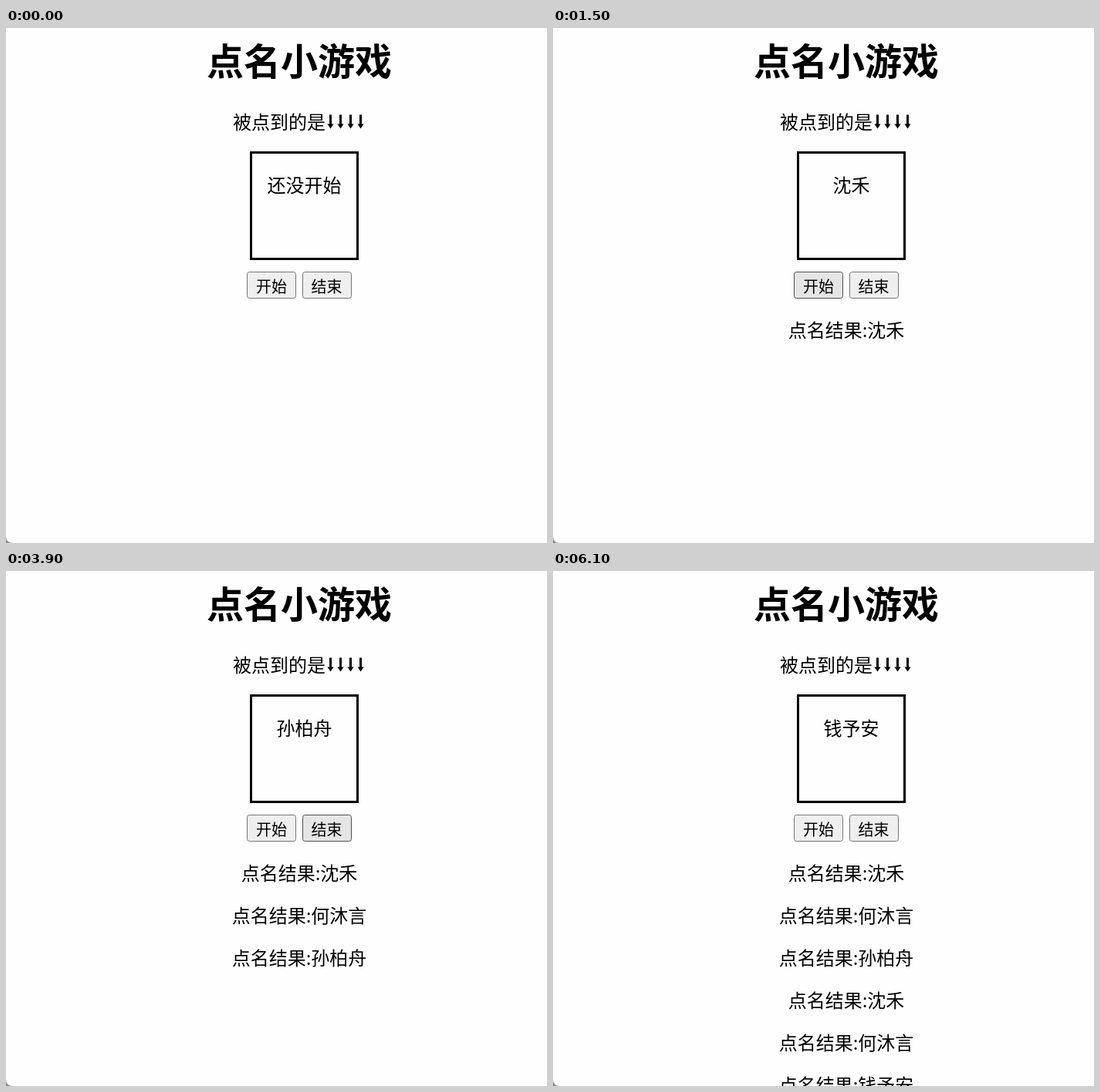
Write an HTML page that moves like this. It is 701 px wide and 668 px high and loops after 7.2 s.

```html
<!DOCTYPE html>
<html lang="zh-CN">
<head>
<meta charset="utf-8">
<style>
html, body { margin: 0; width: 100%; height: 100%; overflow: hidden; background: #fefefe; }
svg { display: block; }
text { font: 350 24px "Noto Sans CJK SC", "Noto Sans CJK", sans-serif; text-anchor: middle; }
.title { font-size: 48px; font-weight: 700; }
.label { font-size: 20px; }
.normal { fill: #efefef; stroke: #767676; }
.hover { fill: #e5e5e5; stroke: #4f4f4f; }
.active { fill: #f5f5f5; stroke: #8d8d8d; }
</style>
</head>
<body>
<svg width="701" height="668" viewBox="0 0 701 668">
  <defs><path id="arrow" d="M-1.5 112.5h3V124.5H4L0 130.5L-4 124.5H-1.5Z"/></defs>
  <path d="M0 659Q0 668 9 668H0Z" fill="#8c8c8c"/>
  <text class="title" x="380" y="61">点名小游戏</text>
  <text x="354" y="131">被点到的是</text>
  <use href="#arrow" x="420.5"/><use href="#arrow" x="433.5"/>
  <use href="#arrow" x="446.5"/><use href="#arrow" x="459.5"/>
  <rect x="317.5" y="161.5" width="138" height="138" fill="none" stroke="#000" stroke-width="3"/>
  <text id="name" x="386.5" y="213"></text>
  <rect id="start" x="312.5" y="316.5" width="63" height="34" rx="3"/>
  <rect id="stop" x="384.5" y="316.5" width="63" height="34" rx="3"/>
  <text class="label" x="344" y="342.5">开始</text>
  <text class="label" x="415.5" y="342.5">结束</text>
  <g id="results"></g>
</svg>
<script>
const LOOP = 7200;
const [LI, HE, SUN, QIAN, DING] = ["沈禾", "何沐言", "孙柏舟", "钱予安", "丁书禾"];
const picks = [[1400, LI], [2500, HE], [3400, SUN], [4200, LI], [5100, HE], [5900, QIAN]];

// [time, button under the pointer, its state]
const pointer = [
  [0, "", ""], [300, "start", "hover"],
  [600, "start", "active"], [700, "start", "hover"], [1200, "stop", "hover"],
  [1300, "stop", "active"], [1400, "stop", "hover"], [1500, "start", "hover"],
  [2000, "start", "active"], [2100, "start", "hover"], [2300, "stop", "hover"],
  [2400, "stop", "active"], [2500, "stop", "hover"], [2700, "start", "hover"],
  [3000, "start", "active"], [3100, "start", "hover"], [3200, "stop", "hover"],
  [3300, "stop", "active"], [3400, "stop", "hover"], [3600, "start", "hover"],
  [3800, "start", "active"], [3900, "stop", "hover"],
  [4100, "stop", "active"], [4200, "stop", "hover"], [4400, "start", "hover"],
  [4700, "start", "active"], [4800, "start", "hover"], [4900, "stop", "hover"],
  [5000, "stop", "active"], [5100, "stop", "hover"], [5300, "start", "hover"],
  [5600, "start", "active"], [5700, "stop", "hover"],
  [5800, "stop", "active"], [5900, "stop", "hover"], [6100, "", ""]
];

// [time, name in the box]
const names = [
  [0, "还没开始"], [600, HE], [700, QIAN], [800, DING], [900, SUN], [1000, LI],
  [1100, HE], [1200, DING], [1300, SUN], [1400, LI],
  [2000, SUN], [2100, QIAN], [2300, LI], [2400, DING], [2500, HE],
  [3000, LI], [3100, QIAN], [3200, DING], [3300, HE], [3400, SUN],
  [4100, QIAN], [4200, LI], [4700, DING], [4800, SUN], [4900, HE],
  [5600, SUN], [5700, LI], [5800, DING], [5900, QIAN]
];

const $ = id => document.getElementById(id);
const at = (list, t) => list.findLast(step => step[0] <= t);

$("results").innerHTML = picks.map(([, name], i) =>
  `<text x="380" y="${401 + 55 * i}">点名结果:${name}</text>`).join("");

function draw(now) {
  const t = now % LOOP;
  const [, button, state] = at(pointer, t);
  for (const id of ["start", "stop"])
    $(id).setAttribute("class", id === button ? state : "normal");
  $("name").textContent = at(names, t)[1];
  picks.forEach(([time], i) => {
    $("results").children[i].style.display = t < time ? "none" : "";
  });
}

let begin;
function tick(now) {
  begin ??= now;
  draw(now - begin);
  requestAnimationFrame(tick);
}
draw(0);
requestAnimationFrame(tick);
</script>
</body>
</html>
```
